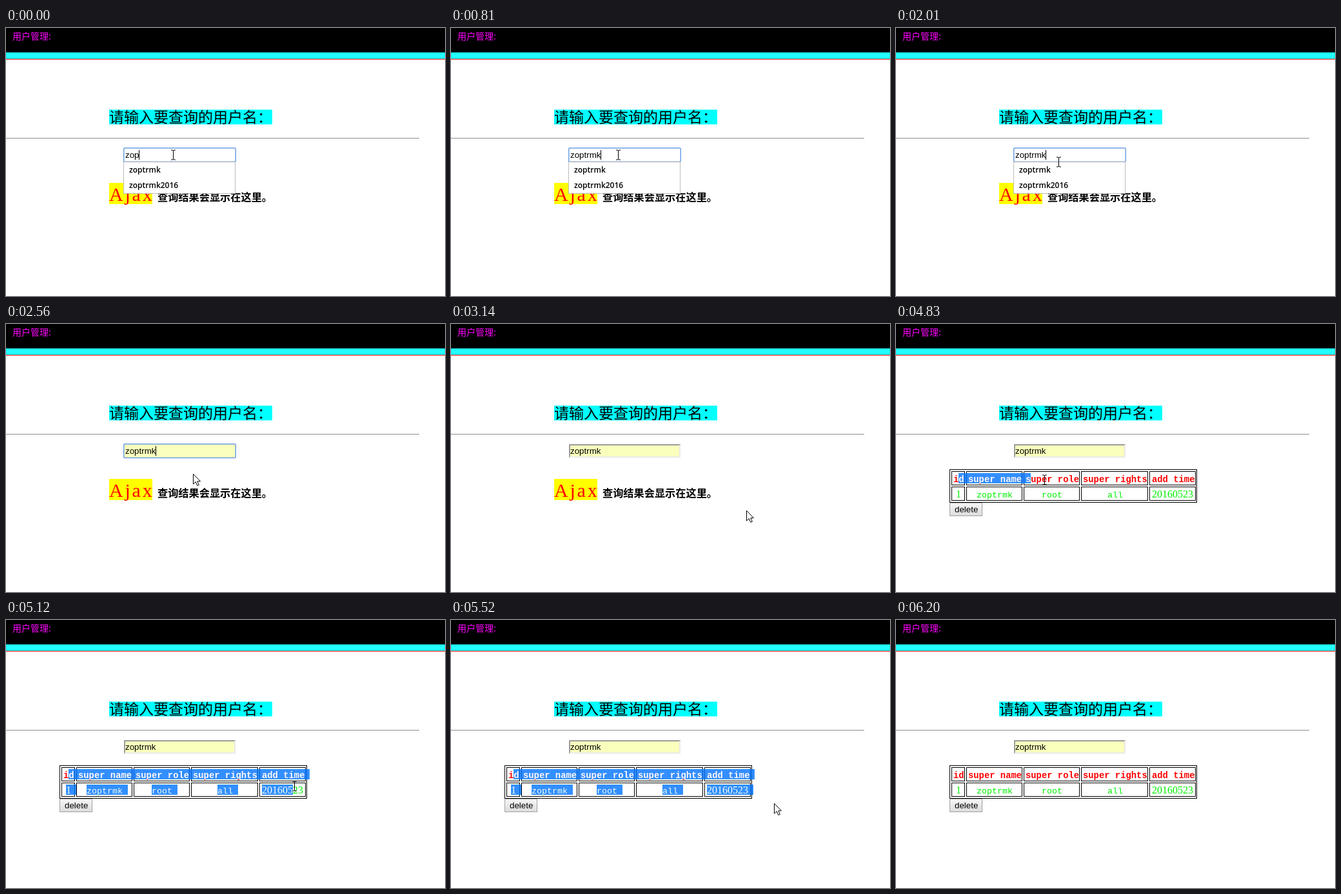
These frames come from a looping animation (681 by 417 pixels, 6.63 s). An HTML page:

```html
<!DOCTYPE html>
<html lang="zh-CN">
<head>
<meta charset="utf-8">
<style>
html, body { margin: 0; height: 100%; overflow: hidden; background: #fff; }
svg { display: block; width: 681px; height: 417px; }
rect, line, #sel { shape-rendering: crispEdges; }
.cjk { font-family: "Noto Sans CJK SC", "Noto Sans CJK", sans-serif; }
.ui { font: 13.33px "Liberation Sans", Arial, sans-serif; }
.item { font: 600 12px "Open Sans", sans-serif; }
.mono { font: 13.33px "Liberation Mono", monospace; }
.mono.head { font-weight: bold; font-size: 13.85px; }
.mono.num { font: 16px "Liberation Serif", serif; }
.ajax { font: 30px "Liberation Serif", serif; letter-spacing: 2.8px; }
</style>
</head>
<body>
<svg viewBox="0 0 681 417">
  <defs>
    <linearGradient id="face" x2="0" y2="1">
      <stop stop-color="#f6f6f6"/><stop offset="1" stop-color="#dcdcdc"/>
    </linearGradient>
    <clipPath id="selClip"><path id="selShape"/></clipPath>
    <g id="heads"></g>
    <g id="cells"></g>
  </defs>

  <rect width="681" height="38"/>
  <rect y="38" width="681" height="10" fill="#2ff"/>
  <rect y="48" width="681" height="1" fill="#e00"/>
  <text class="cjk" x="10" y="18" font-size="14" font-weight="500" fill="#f0f">用户管理:</text>
  <rect x="160" y="127" width="253" height="23" fill="#0ff"/>
  <text class="cjk" x="160" y="147" font-size="23" font-weight="300">请输入要查询的用户名：</text>
  <rect y="171" width="641" height="1" fill="#8c8c8c"/>

  <g id="hint">
    <rect x="160" y="241" width="67" height="33" fill="#ff0"/>
    <text class="ajax" x="160" y="269" fill="red">Ajax</text>
    <text class="cjk" x="235" y="269" font-size="16.2" font-weight="700">查询结果会显示在这里。</text>
  </g>

  <g id="table">
    <g id="grid" fill="none" stroke="#000"></g>
    <use href="#heads" fill="#f00"/>
    <use href="#cells" fill="#0e0"/>
    <path id="sel" fill="rgba(0,116,255,.8)"/>
    <g clip-path="url(#selClip)" fill="#fff"><use href="#heads"/><use href="#cells"/></g>
    <rect x="83.5" y="278.5" width="50" height="20" fill="url(#face)" stroke="#a2a2a2"/>
    <text class="ui" x="91" y="293">delete</text>
  </g>

  <rect id="field" x="183" y="187" width="173" height="21"/>
  <rect id="ring" x="182.75" y="186.75" width="173.5" height="21.5" rx="1.5" fill="none" stroke="#6d9fe8" stroke-width="1.5" style="shape-rendering:auto"/>
  <g id="inset" fill="none" stroke-width="2">
    <path d="M184 208V188H356" stroke="#9c9c9c"/>
    <path d="M184 207H355V188" stroke="#eaeaea"/>
  </g>
  <text id="typed" class="ui" x="185" y="202"></text>
  <rect id="caret" y="190" width="1" height="15"/>

  <g id="popup">
    <rect x="182.5" y="208.5" width="173" height="49" fill="#fff" stroke="#bcbcbc"/>
    <rect id="hover" x="183" y="209" width="172" height="24" fill="#cdcdcd"/>
    <text class="item" x="191" y="225">zoptrmk</text>
    <text class="item" x="191" y="249">zoptrmk2016</text>
  </g>

  <path id="arrow" d="M.5 .5V16.2L4.2 12.7L6.8 18.5L9.3 17.4L6.8 11.8H11.5Z" fill="#fff" stroke="#000"/>
  <path id="beam" d="M-3.5 -7.5H-1.5L0 -6.5L1.5 -7.5H3.5M0 -7V7M-3.5 7.5H-1.5L0 6.5L1.5 7.5H3.5" fill="none" stroke="#000"/>
</svg>
<script>
const LOOP = 6630, NAME = 'zoptrmk';
const $ = id => document.getElementById(id);
const show = (id, on) => $(id).setAttribute('visibility', on ? 'visible' : 'hidden');
const place = (id, x, y) => $(id).setAttribute('transform', `translate(${x} ${y})`);

// left and right edge, heading and its x, value and its x
const columns = [
  [86, 107, 'id', 89, '1', 93],
  [109, 196, 'super name', 112, NAME, 125],
  [198, 285, 'super role', 201, 'root', 226],
  [287, 391, 'super rights', 290, 'all', 328],
  [393, 465, 'add time', 397, '20160523', 397]
];

const box = (x, y, w, h) =>
  `<rect x="${x + .5}" y="${y + .5}" width="${w - 1}" height="${h - 1}"/>`;
const label = (text, x, y, kind) =>
  `<text class="mono ${kind}" x="${x}" y="${y}">${text}</text>`;

$('grid').innerHTML = box(83, 226, 384, 52) + columns.map(([l, r]) =>
  box(l, 229, r - l, 22) + box(l, 253, r - l, 22)).join('');
$('heads').innerHTML = columns.map(c => label(c[2], c[3], 246, 'head')).join('');
$('cells').innerHTML = columns.map(c =>
  label(c[4], c[5], 270, /^\d/.test(c[4]) ? 'num' : '')).join('');

// pointer path: time, x, y
const path = [
  [0, 259.5, 197.5], [1780, 259.5, 197.5], [2010, 252.5, 208.5], [2070, 250, 219],
  [2440, 250, 219], [2700, 335, 250], [3080, 458, 290], [3580, 458, 290],
  [3790, 335, 315], [4010, 155, 282], [4200, 94, 257], [4310, 94, 257],
  [4400, 95, 265], [4500, 98, 243], [4700, 130, 237], [4830, 229.5, 242],
  [4980, 420, 250], [5200, 463, 264], [5520, 501, 285], [5800, 501, 285],
  [6200, 563, 418], [LOOP, 563, 418]
];

function pointer(t) {
  const i = path.findIndex(p => p[0] > t);
  const [t0, x0, y0] = path[i - 1], [t1, x1, y1] = path[i];
  const k = (t - t0) / (t1 - t0);
  return [x0 + (x1 - x0) * k, y0 + (y1 - y0) * k];
}

// block behind the characters between first and the one nearest to x
function block(text, left, pitch, top, x, first = 0) {
  const n = Math.min(text.length, Math.round((x - left) / pitch));
  if (n <= first) return '';
  const from = left + first * pitch;
  const to = left + n * pitch + (n === text.length ? 8 : 0);
  return `M${from} ${top}H${to}V${top + 16}H${from}Z`;
}

function selection(t) {
  if (t < 4520 || t >= 5660) return '';
  const [x, y] = pointer(t - 30), below = y > 252;
  const top = columns.map((c, i) =>
    block(c[2], c[3], 8.3, 232, below ? 999 : x, i ? 0 : 1));
  const low = below ? columns.map(c => block(c[4], c[5], 8, 256, x)) : [];
  // the two rows are joined without overlap seams
  return top.concat(low).join('');
}

function draw(t) {
  const count = 3 + [400, 560, 740, 810].filter(s => t >= s).length;
  const focused = t < 3140, hovered = t >= 2040, found = t >= 3230;
  $('typed').textContent = NAME.slice(0, count);
  $('caret').setAttribute('x', Math.round(184.6 + $('typed').getComputedTextLength()));
  show('caret', t < 1350 || t >= 1850 && t < 2040 || t >= 2440 && t < 2940);
  $('field').setAttribute('fill', hovered ? '#faffbd' : '#fff');
  show('ring', focused);
  show('inset', !focused);
  show('popup', t < 2440);
  show('hover', hovered && t < 2440);
  show('hint', !found);
  show('table', found);

  const d = selection(t);
  $('sel').setAttribute('d', d);
  $('selShape').setAttribute('d', d);

  const [x, y] = pointer(t);
  const beam = t < 2040 || t >= 4160 && t < 5210;
  show('beam', beam);
  show('arrow', !beam && t < 6200);
  place('beam', Math.floor(x) + .5, Math.floor(y) + .5);
  place('arrow', Math.round(x), Math.round(y));
}

function tick() {
  draw(performance.now() % LOOP);
  requestAnimationFrame(tick);
}
tick();
</script>
</body>
</html>
```
